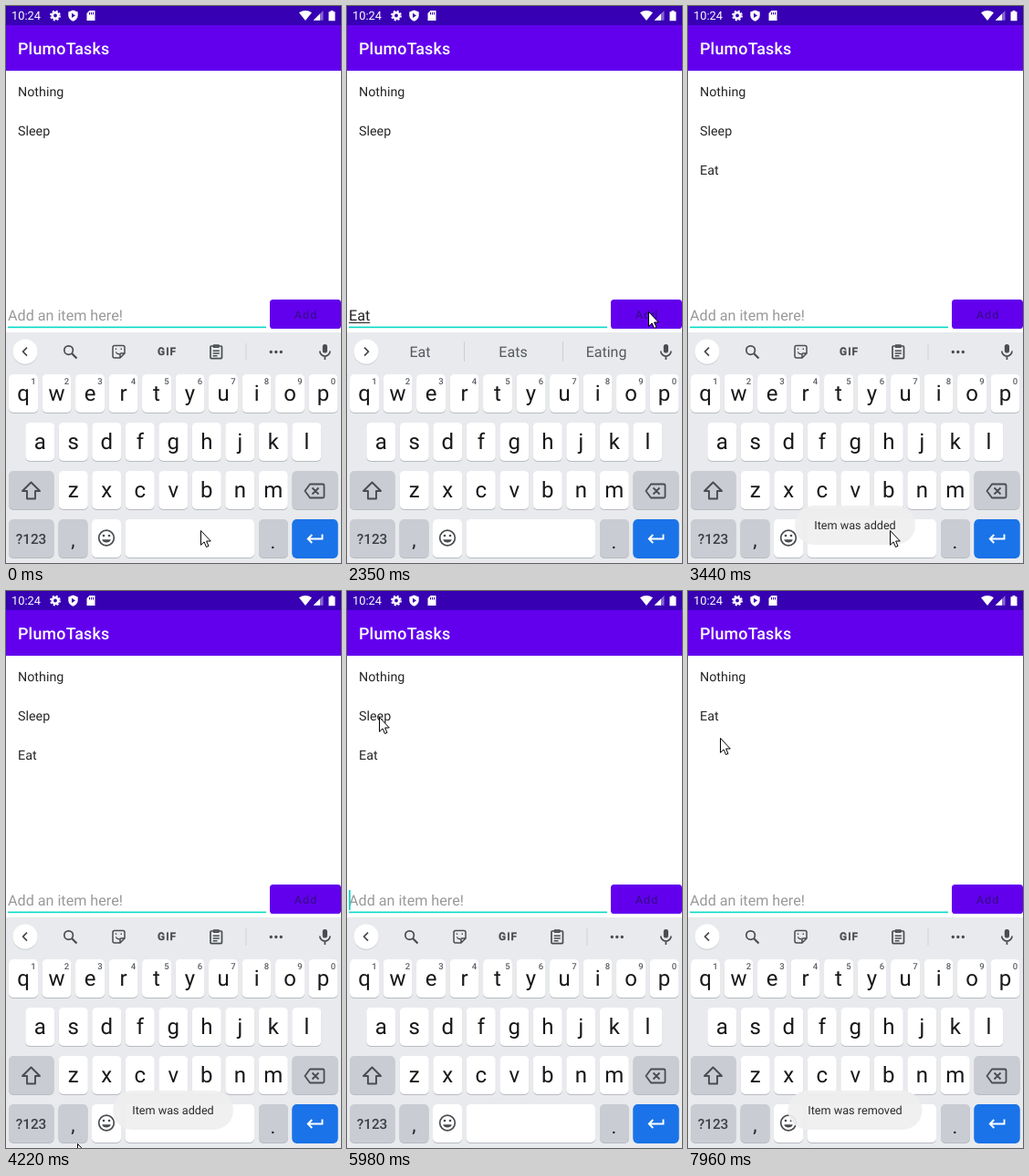
An HTML page that plays this animation: 367x611 px, repeating every 8 s.

```html
<!DOCTYPE html>
<html lang="en">
<head>
<meta charset="utf-8">
<title>To-do list</title>
<style>
  html, body { margin: 0; width: 100%; height: 100%; overflow: hidden; background: #fff; }
  svg { display: block; width: 367px; height: 611px; font-family: Roboto, sans-serif; text-rendering: geometricPrecision; }
  .mid, .word, .letter, .digit { text-anchor: middle; }
  .line { fill: none; stroke: #494c50; stroke-width: 1.7; stroke-linejoin: round; }
  .dots { stroke-linecap: round; stroke-width: 3.4; }
  .item { font-size: 14.3px; fill: #262626; }
  .word { font-size: 16px; fill: #55585d; }
  .letter { font-size: 24px; fill: #17181a; }
  .digit { font-size: 9.5px; font-weight: 500; fill: #5b5e63; }
</style>
</head>
<body>
<svg viewBox="0 0 367 611">
  <rect width="367" height="611" fill="#fff"/>

  <!-- status bar -->
  <rect width="367" height="71" fill="#6200ee"/>
  <rect width="367" height="21" fill="#3700b3"/>
  <g fill="#fff">
    <text x="6" y="15" font-size="12.8">10:24</text>
    <g fill="none" stroke="#fff">
      <circle cx="54" cy="10.5" r="3.2" stroke-width="2.6"/>
      <circle cx="54" cy="10.5" r="4.9" stroke-width="2" stroke-dasharray="2.1 1.75"/>
    </g>
    <path d="M73.5 4.5 78.7 6.5V10.3C78.7 13.4 76.4 15.8 73.5 16.8 70.6 15.8 68.3 13.4 68.3 10.3V6.5Z"/>
    <path d="M72 7.8 76 10.4 72 13Z" fill="#3700b3"/>
    <path d="M91.5 5H97.5V16H88.5V8Z"/>
    <path d="M91.5 7V9.5M93.5 7V9.5M95.5 7V9.5" stroke="#3700b3"/>
    <path d="M321 7.3Q328 2.5 335 7.3L328 16Z"/>
    <path d="M347.5 5V15.8H336.7Z" opacity=".4"/>
    <path d="M344 8.5V15.8H336.7Z"/>
    <path d="M353.5 6.3H355.5V5H358.5V6.3H360.5V16.3H353.5Z"/>
  </g>

  <!-- app bar -->
  <text x="13" y="53" font-size="17.86" font-weight="500" letter-spacing=".2" fill="#fff">PlumoTasks</text>

  <g id="list"></g>

  <!-- entry row -->
  <text id="hint" x="2" y="345" font-size="16.15" fill="#999">Add an item here!</text>
  <text id="entry" x="2" y="345" font-size="16.15" fill="#222"></text>
  <rect id="mark" x="2" y="347" height="1" fill="#222"/>
  <rect x="2" y="351.6" width="283" height="1.6" fill="#03dac5"/>
  <rect id="caret" y="328" width="1.8" height="22" fill="#03dac5"/>
  <rect x="289" y="322" width="78" height="32" rx="3.6" fill="#6200ee"/>
  <text class="mid" x="328.5" y="343" font-size="12.5" font-weight="500" letter-spacing="1.1" fill="#3d0a94">Add</text>

  <!-- keyboard -->
  <rect y="358" width="367" height="253" fill="#e8eaed"/>
  <circle cx="21" cy="380" r="13.7" fill="#c9ccd1"/>
  <circle cx="21" cy="379.2" r="13.6" fill="#fff"/>
  <path id="chevron" class="line" d="M2 -4.5 -2.5 0 2 4.5"/>
  <g class="line">
    <rect x="346.8" y="371" width="5.2" height="9.6" rx="2.6" fill="#494c50" stroke="none"/>
    <path d="M343.8 378.5A5.6 5.6 0 0 0 355 378.5M349.4 384V388"/>
  </g>
  <g id="tools" class="line">
    <circle cx="68.6" cy="377.6" r="4.8"/>
    <path d="M72.2 381.2 77.5 386.5" stroke-width="2.2"/>
    <path d="M119 372.5H128Q130 372.5 130 374.5V381L125 386H119Q117 386 117 384V374.5Q117 372.5 119 372.5ZM130 381H126Q125 381 125 382V386" stroke-width="1.5"/>
    <path d="M120.3 379.5Q122 382.5 124.5 381.5M120.5 375.5V377M126.3 375.5V377" stroke-width="1.4"/>
    <text class="mid" x="176.6" y="383.2" font-size="11.8" font-weight="700" letter-spacing="1" fill="#494c50" stroke="#494c50" stroke-width=".3">GIF</text>
    <rect x="224" y="373" width="12.5" height="13.6" rx="1"/>
    <path d="M227.5 374.2H233V372H227.5ZM226.7 378.3H233.8M226.7 381H233.8M226.7 383.7H231.5" stroke-width="1.4"/>
    <path d="M263 370V389" stroke="#cfd2d7" stroke-width="1"/>
    <path class="dots" d="M290.3 379.5h.01m5.5 0h.01m5.5 0h.01"/>
  </g>
  <g id="words">
    <path d="M128.5 368V390M236.5 368V390" stroke="#cbced3"/>
    <text class="word" x="80" y="385"></text>
    <text class="word" x="182" y="385"></text>
    <text class="word" x="284" y="385"></text>
  </g>
  <g id="keys"></g>
  <g class="line">
    <path d="M27.5 522.5 37 532H32V540.5H23V532H18Z" stroke-width="1.9"/>
    <path d="M333 524.5H347Q348.5 524.5 348.5 526V538Q348.5 539.5 347 539.5H333L327.5 532ZM335.5 528.5 342.5 535.5M342.5 528.5 335.5 535.5" stroke-width="1.8"/>
    <circle cx="110" cy="583.5" r="8.3"/>
    <path d="M105.2 585.3A5 4.6 0 0 0 114.8 585.3Z" fill="#494c50" stroke="none"/>
    <path class="dots" d="M107 581h.01m6 0h.01" style="stroke-width:2.7"/>
    <path d="M346.5 579.5V584.5H331M335.3 580 330.8 584.5 335.3 589" stroke="#fff" stroke-width="1.9" stroke-linejoin="miter"/>
  </g>
  <text class="mid" x="27.5" y="589.5" font-size="15.3" font-weight="500" fill="#3c4043">?123</text>
  <text class="mid" x="73.5" y="593" font-size="22" fill="#222">,</text>
  <text class="mid" x="292.5" y="595" font-size="22" fill="#222">.</text>

  <g id="toast">
    <rect y="548" height="43" rx="21.5" fill="#efefef" opacity=".93"/>
    <text class="mid" x="183" y="574" font-size="12.65" fill="#2b2b2b"></text>
  </g>
  <path id="pointer" d="M.5 .5V16.3L4.1 12.9 6.5 18.5 9 17.4 6.6 12H11.3Z" fill="#fff" stroke="#000"/>
</svg>
<script>
const LOOP = 8000, STEP = 145, BLINK = 966;
const ADDED = 2630, REMOVED = 7150;
const $ = id => document.getElementById(id);
const clamp = u => Math.min(1, Math.max(0, u));
const show = (el, on) => el.setAttribute('visibility', on ? 'visible' : 'hidden');

// Keyboard: letter rows share one pitch, wide keys sit at the edges
const PITCH = 36.5, GREY = '#c9ccd2', BLUE = '#1a73e8';
const cap = (x, y, w, fill) => `<rect x="${x}" y="${y}" width="${w}" height="42" rx="5" fill="${fill}"/>`;
const key = (x, y, w = 32, fill = '#fff') =>
  cap(x, y + 1, w, fill === BLUE ? BLUE : '#b8bbc1') + cap(x, y, w, fill);
const rowY = r => 404 + 53 * r;

let keys = '';
['qwertyuiop', 'asdfghjkl', 'zxcvbnm'].forEach((letters, r) => {
  [...letters].forEach((ch, i) => {
    const x = 183.3 + PITCH * (i - (letters.length - 1) / 2), y = rowY(r);
    keys += key(x - 16, y) + `<text class="letter" x="${x}" y="${y + 29}">${ch}</text>`;
    if (r === 0) keys += `<text class="digit" x="${x + 11}" y="${y + 11.2}">${(i + 1) % 10}</text>`;
  });
});
for (const r of [2, 3]) {
  keys += key(3, rowY(r), 49.5, GREY) + key(313.5, rowY(r), 50, r === 2 ? GREY : BLUE);
}
keys += key(57.5, rowY(3), 32, GREY) + key(94, rowY(3)) +
  key(130.5, rowY(3), 141.5) + key(277, rowY(3), 32, GREY);
$('keys').innerHTML = keys;

// Pointer legs: start, end, x, y
const legs = [
  [1410, 1650, 292, 359], [1790, 1930, 351, 345], [1930, 2350, 330, 335],
  [2870, 3560, 213, 592], [3560, 4220, 78, 606], [4220, 5090, 23, 153],
  [5490, 5970, 35, 138], [7560, 7960, 35, 161]
];

function pointerAt(t) {
  let x = 213, y = 575;
  for (const [start, end, toX, toY] of legs) {
    const n = Math.round((end - start) / STEP);
    const u = Math.floor(clamp((t - start) / (end - start)) * n) / n;
    const e = 1 - (1 - u) ** 1.7;
    x += (toX - x) * e;
    y += (toY - y) * e;
  }
  return [Math.round(x), Math.round(y)];
}

// Typing; every edit restarts the caret blink
const edits = [[250 - BLINK, ''], [960, 'E'], [1120, 'Ea'], [1410, 'Eat'], [ADDED, '']];
const editAt = t => edits.filter(([time]) => time <= t).pop();
const suggestions = { E: ['E', 'EA', 'Early'], Ea: ['Ea', 'EA', 'Early'], Eat: ['Eat', 'Eats', 'Eating'] };

const fade = (t, start) => clamp((t - start) / 280);
const [toastBox, toastText] = $('toast').children;
const wordTexts = $('words').querySelectorAll('text');

function draw(t) {
  $('pointer').setAttribute('transform', `translate(${pointerAt(t)})`);

  const items = ['Nothing', t < REMOVED && 'Sleep', t >= ADDED && 'Eat'].filter(Boolean);
  $('list').innerHTML = items
    .map((s, i) => `<text class="item" x="13" y="${98.5 + 43 * i}">${s}</text>`).join('');

  const [since, typed] = editAt(t);
  $('entry').textContent = typed;
  const width = typed && $('entry').getComputedTextLength();
  $('mark').setAttribute('width', width || 0);
  $('caret').setAttribute('x', 2 + Number(width));
  show($('caret'), (t - since) % BLINK < BLINK / 2);
  show($('hint'), !typed);

  const words = suggestions[editAt(t - 120)[1]];
  wordTexts.forEach((el, i) => el.textContent = words ? words[i] : '');
  show($('words'), words);
  show($('tools'), !words);
  $('chevron').setAttribute('transform', `translate(21 379.2) scale(${words ? -1 : 1} 1)`);

  const removed = t >= REMOVED, half = removed ? 73.5 : 66;
  toastBox.setAttribute('x', 183 - half);
  toastBox.setAttribute('width', 2 * half);
  toastText.textContent = removed ? 'Item was removed' : 'Item was added';
  $('toast').setAttribute('opacity', fade(t, 2650) - fade(t, 4790) + fade(t, 7430));
}

const begin = performance.now();
function tick() {
  draw((performance.now() - begin) % LOOP);
  requestAnimationFrame(tick);
}
tick();
</script>
</body>
</html>
```
